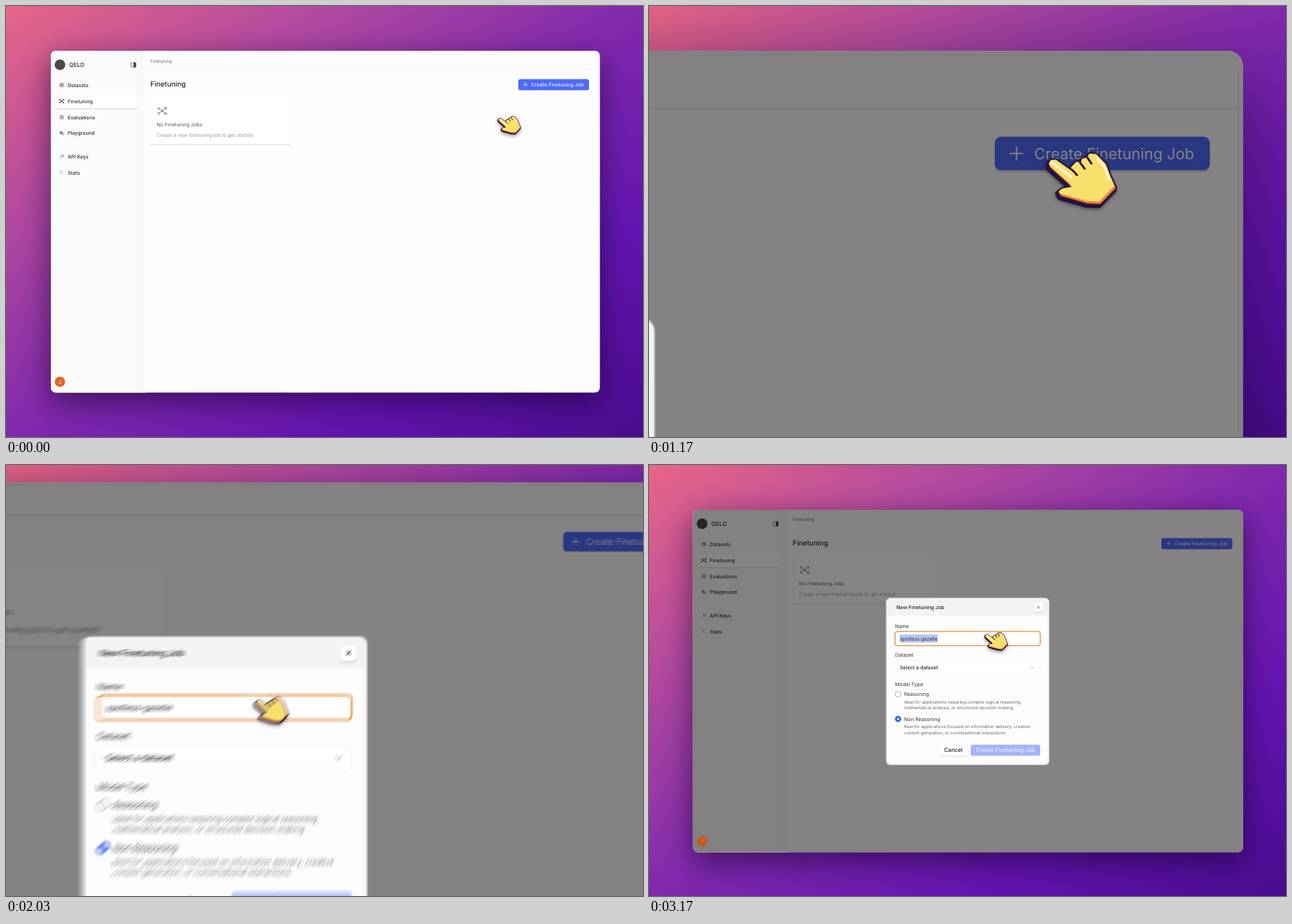
These frames come from a looping animation (909 px wide and 616 px high, 3.21 s). An HTML page with a canvas:

```html
<!DOCTYPE html>
<html lang="en">
<head>
<meta charset="utf-8">
<title>Finetuning</title>
<style>
html, body { margin: 0; width: 100%; height: 100%; overflow: hidden; background: #7a22b0; }
canvas { display: block; width: 909px; height: 616px; }
</style>
</head>
<body>
<canvas id="stage" width="909" height="616"></canvas>
<script>
const W = 909, H = 616, LOOP = 3210;
const WIN = { x: 64, y: 64, w: 783.5, h: 488.5, r: 7 };
const RIGHT = WIN.x + WIN.w;
const CLICKS = [560, 1985, 2215, 2585];
const OPEN = 640, SHUTTER = 14;

const view = document.getElementById('stage').getContext('2d');
const layer = document.createElement('canvas');
layer.width = W;
layer.height = H;
const c = layer.getContext('2d');
c.textRendering = 'geometricPrecision';

const clamp = (v, a = 0, b = 1) => Math.min(b, Math.max(a, v));
const mix = (a, b, p) => a + (b - a) * p;

// Critically damped step from 0 to 1, starting at t0 (ms).
function spring(t, t0, speed) {
  const x = Math.max(0, t - t0) / 1000 * speed;
  return 1 - (1 + x) * Math.exp(-x);
}

function smooth(t, t0, t1) {
  const u = clamp((t - t0) / (t1 - t0));
  return u * u * (3 - 2 * u);
}

function camera(t) {
  const zoom = 2.085 * (spring(t, 247, 6.2) - spring(t, 1680, 6.2));
  return {
    s: 1 + zoom,
    x: RIGHT + 202 * smooth(t, 1336, 1911) * zoom,
    y: WIN.y - 52 * smooth(t, 1388, 1950) * zoom
  };
}

function pointer(t) {
  const a = spring(t, 80, 13);
  return {
    x: mix(mix(702.5, 756, a), 480, smooth(t, 1170, 1890)),
    y: mix(mix(161, 115.4, a), 242.5, smooth(t, 1248, 1903))
  };
}

function pressScale(t) {
  let k = 1;
  for (const at of CLICKS) {
    const age = t - at;
    if (age < 0) continue;
    const down = clamp(age / 40), up = clamp((age - 120) / 180);
    k = Math.min(k, 1 - 0.17 * down * (1 - up));
  }
  return k;
}

function box(x, y, w, h, r, fill, stroke, line = 0.5) {
  c.beginPath();
  c.roundRect(x, y, w, h, r);
  if (fill) { c.fillStyle = fill; c.fill(); }
  if (stroke) { c.strokeStyle = stroke; c.lineWidth = line; c.stroke(); }
}

function raised(x, y, w, h, r) {
  box(x - 0.5, y + 0.4, w + 1, h + 1.5, r, 'rgba(0,0,0,.035)');
  box(x - 0.1, y + 0.4, w + 0.2, h + 0.8, r, 'rgba(0,0,0,.09)');
  box(x, y, w, h, r, '#fff', '#f6f6f6', 0.4);
}

function text(s, x, y, size, color, weight = 400, align = 'left') {
  c.font = `${weight} ${size}px Inter, "Liberation Sans", sans-serif`;
  c.textAlign = align;
  c.fillStyle = color;
  c.fillText(s, x, y + size * 0.36);
}

function line(color, width, ...p) {
  c.beginPath();
  c.moveTo(p[0], p[1]);
  for (let i = 2; i < p.length; i += 2) c.lineTo(p[i], p[i + 1]);
  c.strokeStyle = color;
  c.lineWidth = width;
  c.stroke();
}

function disc(x, y, r, fill, stroke, width = 0.7) {
  c.beginPath();
  c.arc(x, y, r, 0, 7);
  if (fill) { c.fillStyle = fill; c.fill(); }
  if (stroke) { c.strokeStyle = stroke; c.lineWidth = width; c.stroke(); }
}

function nodes(x, y, r, color, width) {
  line(color, width, x - r, y - r * 0.7, x + r, y + r * 0.8);
  line(color, width, x + r, y - r * 0.8, x - r, y + r * 0.7);
  for (const [a, b] of [[-1, -0.7], [1, -0.8], [-1, 0.7], [1, 0.8]])
    disc(x + a * r, y + b * r, r * 0.27, '#fdfdfd', color, width);
  disc(x, y, r * 0.3, color);
}

function backdrop() {
  const k = 2 / (1 / (W * W) + 1 / (H * H));
  const g = c.createLinearGradient(0, 0, k / W, k / H);
  ['#e86686', '#b24a9f', '#8029ac', '#6214b0', '#480b8e']
    .forEach((col, i) => g.addColorStop(i / 4, col));
  c.fillStyle = g;
  c.fillRect(0, 0, W, H);
}

function sideIcon(kind, x, y) {
  const col = '#777';
  if (kind === 'data') {
    box(x - 2.6, y - 2.4, 5.2, 5, 1.4, '#bbb', col, 0.6);
    line(col, 0.6, x - 2.6, y - 0.6, x + 2.6, y - 0.6);
  } else if (kind === 'tune') {
    nodes(x, y, 2.7, '#333', 0.8);
  } else if (kind === 'eval') {
    box(x - 2.5, y - 2.5, 5, 5, 0.8, '#ddd', col, 0.6);
    line(col, 0.6, x, y - 2.5, x, y + 2.5);
    line(col, 0.6, x - 2.5, y, x + 2.5, y);
  } else if (kind === 'play') {
    disc(x - 0.8, y - 0.5, 2.2, '#888');
    disc(x + 1.6, y + 1.2, 1.6, '#ccc', col, 0.5);
  } else if (kind === 'key') {
    disc(x + 1.1, y - 1, 1.7, null, col, 0.8);
    line(col, 0.8, x, y, x - 2.7, y + 2.7);
  } else {
    line('#999', 0.7, x - 2.8, y + 2.4, x - 0.8, y - 1.6, x + 1, y + 0.6, x + 2.8, y + 2.4);
    line('#999', 0.7, x - 2.8, y - 2, x, y - 2);
  }
}

function appWindow(t, scale) {
  c.save();
  c.shadowColor = 'rgba(20,0,40,.6)';
  c.shadowBlur = 44 * scale;
  c.shadowOffsetY = 13 * scale;
  box(WIN.x, WIN.y, WIN.w, WIN.h, WIN.r, '#fdfdfd');
  c.restore();

  const side = c.createLinearGradient(180, 0, 200, 0);
  side.addColorStop(0, '#fbfbfb');
  side.addColorStop(0.7, '#f9f9f9');
  side.addColorStop(1, '#fdfdfd');
  box(WIN.x, WIN.y, 136, WIN.h, [WIN.r, 0, 0, WIN.r], side);
  box(WIN.x + 2, WIN.y + 2, WIN.w - 4, WIN.h - 4, 5.5, null, 'rgba(0,0,0,.09)', 0.35);
  line('#e9e9e9', 0.6, 194, 91, RIGHT - 2, 91);

  disc(77, 84, 7.6, '#4a4a4a');
  text('QELD', 90, 84.3, 8.3, '#333', 500);
  box(178.4, 80.8, 7, 6.6, 1, '#eee', '#555', 0.7);
  box(182, 80.8, 3.4, 6.6, 0.8, '#444');

  raised(70, 127, 117, 19, 2.5);
  const items = [
    ['data', 'Datasets', 113], ['tune', 'Finetuning', 136], ['eval', 'Evaluations', 159],
    ['play', 'Playground', 181.5], ['key', 'API Keys', 215.2], ['stat', 'Stats', 238]
  ];
  for (const [kind, label, y] of items) {
    sideIcon(kind, 79.5, y);
    text(label, 88, y, 7.1, '#2c2c2c', 500);
  }

  text('Finetuning', 206, 78.3, 6.2, '#666');
  text('Finetuning', 206, 111, 10, '#222', 500);
  raised(206, 134, 200.5, 63.5, 2.5);
  nodes(223, 150, 5, '#777', 0.9);
  text('No Finetuning Jobs', 215, 169.8, 7.1, '#555');
  text('Create a new finetuning job to get started', 215, 184.2, 7, '#999');

  box(731, 105.2, 101, 16, 3, 'rgba(0,0,40,.12)');
  box(731, 104.4, 101, 15.8, 3, '#4d6bfa');
  line('#fff', 0.65, 738, 112.3, 744.4, 112.3);
  line('#fff', 0.65, 741.2, 109.1, 741.2, 115.5);
  text('Create Finetuning Job', 749.5, 112.3, 7.2, '#fff');

  const dim = 0.485 * clamp((t - OPEN) / 80);
  if (dim) box(WIN.x, WIN.y, WIN.w, WIN.h, WIN.r, `rgba(5,1,2,${dim})`);

  disc(77, 537, 7.3, dim ? '#c9591c' : '#e0661f');
  text('J', 77, 537, 7, dim ? '#e08a50' : '#fff', 400, 'center');
}

function nameField(t) {
  const focus = t >= CLICKS[1];
  if (!focus) raised(351, 237, 207, 21, 3.5);
  else box(351.2, 237.5, 206.8, 20.2, 3.5, '#fff', '#e6872f', 1.3);
  c.font = '400 7.1px Inter, "Liberation Sans", sans-serif';
  const full = c.measureText('spotless gazelle').width;
  const word = c.measureText('gazelle').width;
  const sel = t >= CLICKS[3] ? full : t >= CLICKS[2] ? word : 0;
  if (sel) box(358 + full - sel, 241.8, sel, 11.4, 0, '#b3c4f0');
  text('spotless gazelle', 358, 247.6, 7.1, '#333');
}

function option(label, y, on, a, b) {
  disc(355.5, y, 4, on ? '#3b62f0' : '#fff', on ? '#3b62f0' : '#888', 0.7);
  if (on) disc(355.5, y, 1.5, '#fff');
  text(label, 364, y, 7.2, '#333');
  text(a, 364, y + 11.3, 6.15, '#666');
  text(b, 364, y + 19.6, 6.15, '#666');
}

function modal(t) {
  if (t < OPEN) return;
  c.save();
  c.globalAlpha = clamp((t - OPEN) / 80 + 0.1);
  c.translate(0.5, 0.2);
  box(338, 189.2, 233.2, 239, 6.4, 'rgba(255,255,255,.35)');
  box(338.7, 189.8, 231.8, 237.8, 6, '#f3f3f3');
  box(340.8, 215, 227.6, 210.5, 4, '#fdfdfd');
  text('New Finetuning Job', 353, 203, 7.2, '#222', 500);
  raised(549, 196.6, 13, 13, 3.2);
  line('#555', 0.8, 553.7, 201.2, 557.4, 204.9);
  line('#555', 0.8, 557.4, 201.2, 553.7, 204.9);

  text('Name', 351.2, 230.3, 7.2, '#333');
  nameField(t);
  text('Dataset', 351.2, 271, 7.2, '#333');
  box(351, 279, 207, 19.5, 3.5, '#fff', '#f3f3f3', 0.7);
  text('Select a dataset', 358, 288.5, 7.1, '#222', 500);
  line('#999', 0.7, 544.6, 287.3, 547.2, 289.9, 549.8, 287.3);
  text('Model Type', 351.2, 312.3, 7.2, '#333');
  option('Reasoning', 327, false,
    'Ideal for applications requiring complex logical reasoning,',
    'mathematical analysis, or structured decision-making.');
  option('Non Reasoning', 362.2, true,
    'Best for applications focused on information delivery, creative',
    'content generation, or conversational interactions.');

  raised(414.3, 398.4, 39.8, 16.4, 3);
  text('Cancel', 434.2, 406.8, 8, '#222', 500, 'center');
  box(459, 399, 99, 15.6, 3, '#a4b3fb');
  text('Create Finetuning Job', 508.5, 406.8, 8, '#f6f8ff', 400, 'center');
  c.restore();
}

function ripples(t) {
  const p = pointer(t);
  for (const at of CLICKS) {
    const age = (t - at) / 380;
    if (age <= 0 || age >= 1) continue;
    const r = 40 * (1 - Math.pow(1 - age, 2));
    disc(p.x, p.y, r, `rgba(255,255,255,${0.14 * (1 - age)})`);
  }
}

const HAND = [
  0.4, 1.6, 1.4, 0, 3.6, -0.2, 11.8, 5.6, 10.8, 3.4, 13.4, 0.8, 15.4, 1.4, 16, -0.6,
  18.4, -1.2, 19.4, -3, 22.6, -2.8, 27.2, 2, 29.4, 7.8, 31.8, 13.2, 24.6, 20.6,
  18.6, 20.4, 6, 16.8, 5, 14.8, 6.6, 13.4, 11.2, 12.6, 1, 3.4
];

function handPath() {
  c.beginPath();
  for (let i = 0; i < HAND.length; i += 2) c.lineTo(HAND[i], HAND[i + 1]);
  c.closePath();
}

function hand(t) {
  const p = pointer(t), k = pressScale(t);
  c.save();
  c.translate(p.x, p.y);
  c.scale(k, k);
  c.lineJoin = c.lineCap = 'round';

  c.save();
  c.translate(-0.6, 0.9);
  handPath();
  c.fillStyle = c.strokeStyle = '#2b1745';
  c.lineWidth = 2.2;
  c.shadowColor = 'rgba(0,0,0,.35)';
  c.shadowBlur = 5;
  c.shadowOffsetY = 2;
  c.stroke();
  c.fill();
  c.restore();

  handPath();
  c.strokeStyle = '#2b1745';
  c.lineWidth = 1.5;
  c.stroke();
  c.fillStyle = '#f27a3c';
  c.fill();
  c.save();
  c.clip();
  c.translate(-0.5, -1.1);
  handPath();
  c.fillStyle = '#f8e06c';
  c.fill();
  line('#fff3cf', 1.3, 2, 2, 11.4, 9);
  line('#fff3cf', 1.2, 23.4, 0.2, 27, 4.2, 29.2, 10);
  c.restore();

  line('#2b1745', 1, 11.4, 4.6, 13.6, 7);
  line('#2b1745', 1, 15.2, 1.4, 17.2, 4);
  line('#2b1745', 1, 18.6, -1, 20.4, 1.6);
  c.restore();
}

function scene(t) {
  c.setTransform(1, 0, 0, 1, 0, 0);
  backdrop();
  const cam = camera(t);
  c.setTransform(cam.s, 0, 0, cam.s, cam.x - RIGHT * cam.s, cam.y - WIN.y * cam.s);
  appWindow(t, cam.s);
  modal(t);
  ripples(t);
  hand(t);
}

// Largest on-screen travel during the shutter time.
function travel(a, b) {
  const at = (t, p) => {
    const m = camera(t);
    return [m.x + (p.x - RIGHT) * m.s, m.y + (p.y - WIN.y) * m.s];
  };
  const dist = (p, q) => {
    const u = at(a, p), v = at(b, q);
    return Math.hypot(u[0] - v[0], u[1] - v[1]);
  };
  const mid = { x: 455, y: 308 };
  return Math.max(dist(pointer(a), pointer(b)), dist(mid, mid));
}

function draw(t) {
  const from = Math.max(0, t - SHUTTER / 2);
  const to = Math.min(LOOP, t + SHUTTER / 2);
  const d = travel(from, to);
  const n = d < 1 ? 1 : clamp(Math.ceil(d / 2), 2, 8);
  for (let i = 0; i < n; i++) {
    scene(n === 1 ? t : mix(from, to, (i + 0.5) / n));
    view.globalAlpha = 1 / (i + 1);
    view.drawImage(layer, 0, 0);
  }
}

const start = performance.now();
function tick() {
  draw((performance.now() - start) % LOOP);
  requestAnimationFrame(tick);
}
tick();
</script>
</body>
</html>
```
